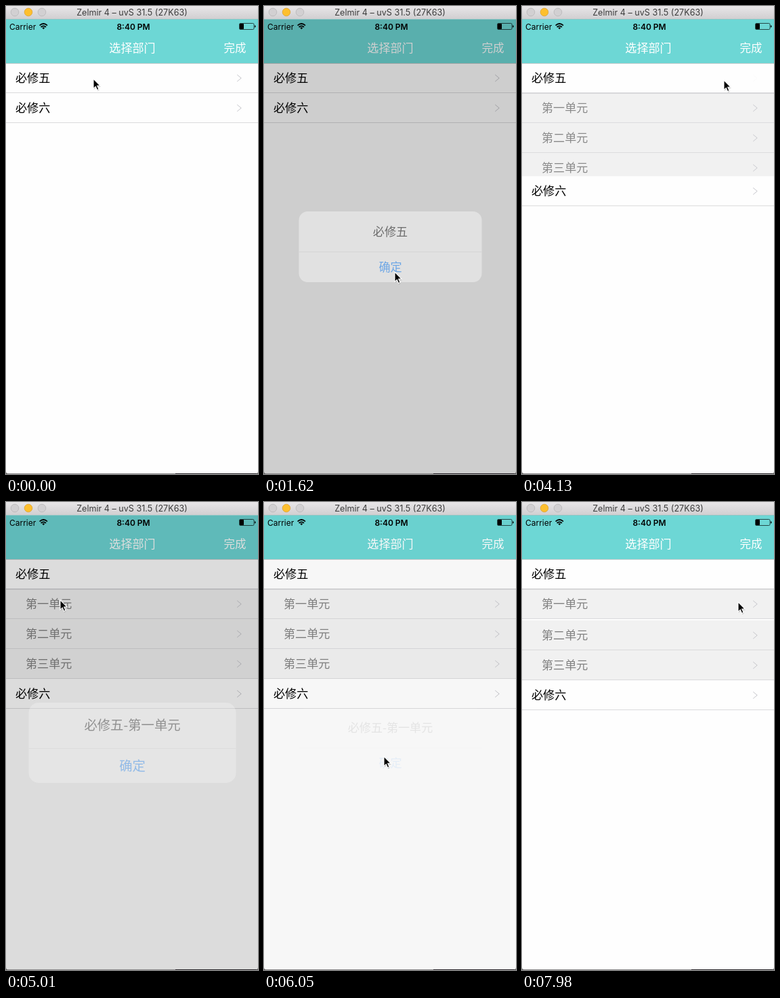
These frames come from a looping animation (372x688 px, 8000 ms). An HTML page:

```html
<!DOCTYPE html>
<html lang="zh-CN">
<head>
<meta charset="utf-8">
<style>
html, body { margin: 0; width: 100%; height: 100%; overflow: hidden; background: #fefefe; }
svg { display: block; width: 372px; height: 688px; }
text { font: 17.1px "Noto Sans CJK SC", "Noto Sans CJK", sans-serif; }
.latin { font: 12px Inter, Roboto, sans-serif; }
.window { font-size: 12.6px; }
.strong { font-weight: 600; }
.medium { font-weight: 500; }
.mid { text-anchor: middle; }
</style>
</head>
<body>
<svg viewBox="0 0 372 688">
  <defs>
    <linearGradient id="bar" x2="0" y2="1">
      <stop stop-color="#e8e6e8"/><stop offset="1" stop-color="#d1cfd1"/>
    </linearGradient>
  </defs>
  <rect width="372" height="688" fill="#fefefe"/>
  <g id="list"></g>

  <!-- navigation and status bars -->
  <rect y="19" width="372" height="65" fill="#6dd7d5"/>
  <rect y="84" width="372" height="1" fill="#c6cccc"/>
  <text class="latin" x="5" y="34.5">Carrier</text>
  <g fill="none" stroke="#000" stroke-width="1.7">
    <path d="M49.6 28.6Q55.3 23.4 61 28.6M51.6 31Q55.3 27.6 59 31"/>
    <path d="M53.3 32Q55.3 30.4 57.3 32L55.3 34.2Z" fill="#000" stroke="none"/>
  </g>
  <text class="latin strong mid" x="188" y="34.5">8:40 PM</text>
  <rect x="344.5" y="25.5" width="21.5" height="9" rx="1.5" fill="none" stroke="#1d3938" stroke-width=".9"/>
  <rect x="345" y="26" width="6" height="8" rx=".8"/>
  <path d="M367 28.3q1.6.3 1.6 1.7t-1.6 1.7Z"/>
  <text class="mid" x="186.5" y="68" fill="#fff">选择部门</text>
  <text x="354.5" y="67.5" text-anchor="end" fill="#fff" style="font-size:16.5px">完成</text>

  <rect id="dim" y="20" width="372" height="667"/>
  <g id="alert">
    <rect x="51.5" y="302" width="270" height="104" rx="13" fill="#f8f8f8"/>
    <rect x="51.5" y="361" width="270" height="1" fill="#dcdcde"/>
    <text id="message" class="mid medium" x="186.5" y="337.5"></text>
    <text class="mid medium" x="186.5" y="390.3" fill="#007aff">确定</text>
  </g>

  <!-- window frame -->
  <rect width="372" height="19" fill="url(#bar)"/>
  <rect y="19" width="372" height="1" fill="#a9b9b9" opacity=".6"/>
  <g fill="#d2d0d2" stroke="#b8b6b8" stroke-width=".8">
    <circle cx="13" cy="9" r="5.8"/>
    <circle cx="33" cy="9" r="5.8" fill="#fdbf2e" stroke="#dea233"/>
    <circle cx="53" cy="9" r="5.8"/>
  </g>
  <text class="latin window mid" x="186" y="13.8" fill="#3c3c3c">Zelmir 4 – uvS 31.5 (27K63)</text>
  <rect y="687" width="250" height="1" fill="#8d8b8d"/>
  <rect x="250" y="687" width="122" height="1" fill="#2a262b"/>
  <path d="M0 684V688H4Q0 688 0 684M372 684V688H368Q372 688 372 684" fill="#555"/>

  <g id="cursor">
    <path d="M0 0V14.3L3.3 11.3 5.6 16.6 8 15.6 5.7 10.4H10.2Z" transform="translate(.7 1.5)" opacity=".22"/>
    <path d="M0 0V14.3L3.3 11.3 5.6 16.6 8 15.6 5.7 10.4H10.2Z" stroke="#fff" stroke-width="1.1"/>
  </g>
</svg>
<script>
const LOOP = 8000, STEP = 147.5, ROW = 44, TOP = 84;
const $ = id => document.getElementById(id);
const ramp = (t, start, length) => Math.min(1, Math.max(0, (t - start) / length));
const smooth = x => x * x * (3 - 2 * x);
const slide = (t, start) => smooth(ramp(t, start, 300));

// start, end, x, y of each pointer move
const moves = [
  [380, 1180, 193, 397], [1190, 1320, 193, 391], [1700, 2360, 298, 109],
  [4200, 4720, 80, 144], [5080, 5600, 177, 374], [6100, 6640, 319, 147]
];
const alerts = [
  { show: 8, hide: 1512, text: '必修五' },
  { show: 4875, hide: 5790, text: '必修五-第一单元' }
];
const levels = [
  { indent: 14, fill: '#fefefe', ink: '#000' },
  { indent: 29, fill: '#f1f1f1', ink: '#808080' },
  { indent: 44, fill: '#e8e8e8', ink: '#808080' }
];

function row(label, level, y, opacity = 1, chevron = 1) {
  const { indent, fill, ink } = levels[level];
  return `<g transform="translate(0 ${y})" opacity="${opacity}">
    <rect width="372" height="44" fill="${fill}"/>
    <rect y="43" width="372" height="1" fill="#dadadc"/>
    <text x="${indent}" y="28.2" fill="${ink}">${label}</text>
    <path d="M341.2 17L347.2 22L341.2 27" fill="none" stroke="#c7c7cc" opacity="${chevron}"/>
  </g>`;
}

function drawList(t) {
  const book = slide(t, 2430) - slide(t, 3290) + slide(t, 3880);
  const unit = slide(t, 6830) - slide(t, 7692);
  const at = i => TOP + ROW * i;
  const shift = 2 * ROW * unit;
  let rows = '';
  if (unit) rows += row('第一课', 2, at(2), unit, 0) + row('第二课', 2, at(3), unit, 0);
  if (book) {
    rows += row('第三单元', 1, at(3) + shift, book)
      + row('第二单元', 1, at(2) + shift, book)
      + row('第一单元', 1, at(1), book, 1 - unit);
  }
  rows += row('必修六', 0, at(1) + 3 * ROW * book + shift) + row('必修五', 0, TOP, 1, 1 - book);
  rows += `<rect y="128" width="372" height="1" fill="#d4d4d6" opacity="${book}"/>`;
  $('list').innerHTML = rows;
}

function drawAlert(t) {
  const { show, hide, text } = alerts[t < 4000 ? 0 : 1];
  const shown = smooth(ramp(t, show, 360));
  const opacity = shown * (1 - ramp(t, hide, 351)) ** 2;
  const scale = 1.2 - 0.2 * shown;
  $('message').textContent = text;
  $('dim').setAttribute('opacity', 0.4 * opacity);
  $('alert').setAttribute('opacity', opacity);
  $('alert').setAttribute('transform',
    `translate(186.5 354) scale(${scale}) translate(-186.5 -354)`);
}

function drawCursor(t) {
  let x = 129, y = 107;
  for (const [start, end, toX, toY] of moves) {
    const p = smooth(ramp(t, start, end - start));
    x += (toX - x) * p;
    y += (toY - y) * p;
  }
  $('cursor').setAttribute('transform', `translate(${x} ${y})`);
}

let last = -1;
function tick() {
  const step = Math.floor((performance.now() % LOOP + 10) / STEP);
  if (step !== last) {
    last = step;
    const t = step * STEP;
    drawList(t);
    drawAlert(t);
    drawCursor(t);
  }
  requestAnimationFrame(tick);
}
tick();
</script>
</body>
</html>
```
